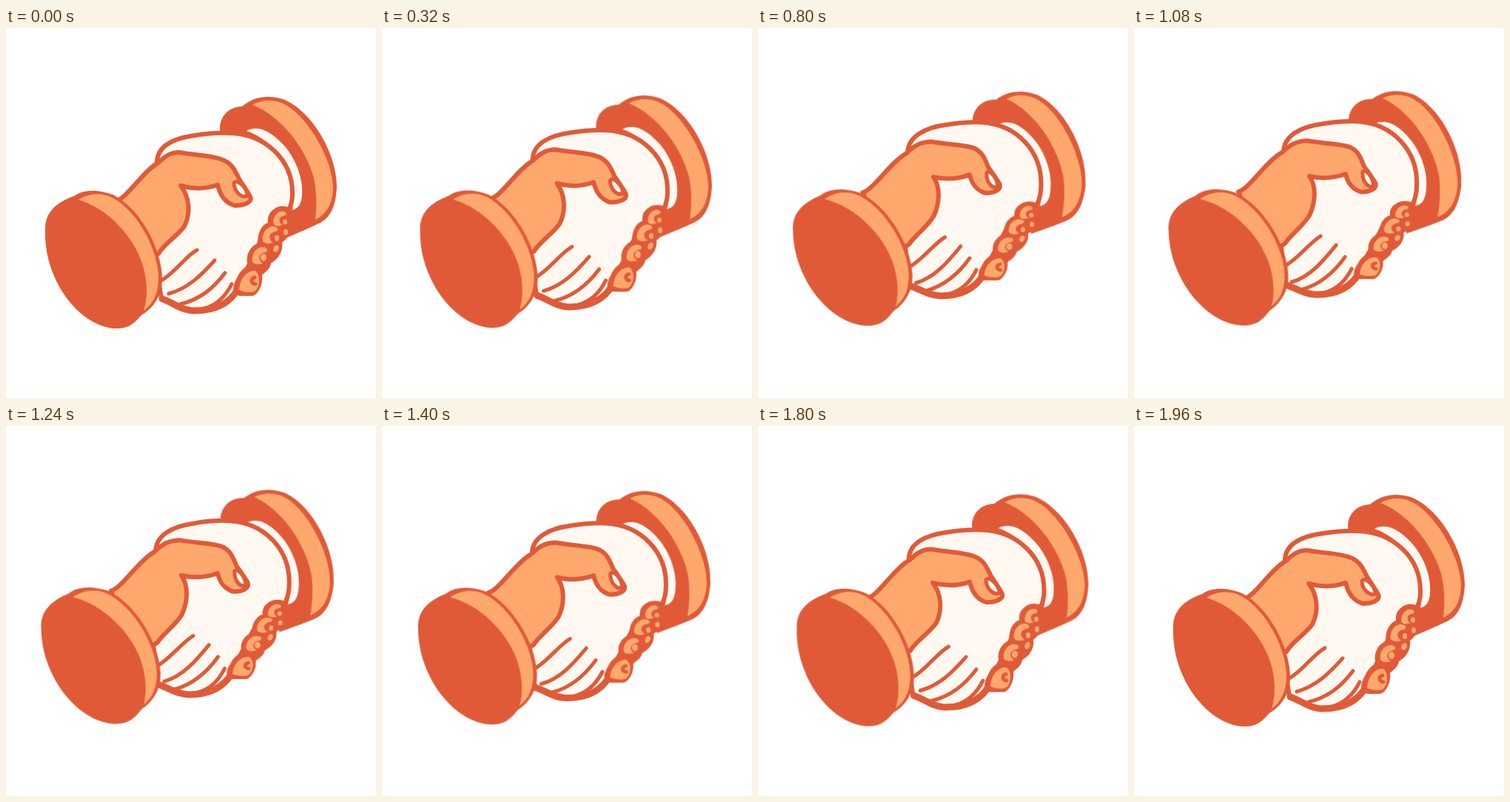
An HTML page without scripts for the animation above (2000 ms loop, 500 by 500 pixels).

```html
<!DOCTYPE html>
<html lang="en">
<head>
<meta charset="utf-8">
<title>Handshake</title>
<style>
  :root { --red: #e15a38; --orange: #fea86e; --cream: #fff9f2; }
  html, body { margin: 0; width: 100%; height: 100%; overflow: hidden; background: #fff; }
  svg { display: block; width: 100vw; height: 100vh; }

  .red { fill: var(--red); }
  .orange { fill: var(--orange); }
  .cream { fill: var(--cream); }
  .line { fill: none; }
  .ink { stroke: var(--red); stroke-width: 6; stroke-linecap: round; stroke-linejoin: round; }
  .thin { stroke-width: 5; }
  .thick { stroke-width: 9; }

  /* every part swings between the low and the high pose */
  .swing { animation: 1s cubic-bezier(.37, 0, .63, 1) infinite alternate; }
  #leftCuff { transform-origin: 80px 380px; animation-name: leftCuff; }
  #rightCuff { transform-origin: 466px 144px; animation-name: rightCuff; }
  #hand { animation-name: hand; }
  #base { animation-name: base; }
  #slits { animation-name: slits; }
  #arm { animation-name: arm; }
  #nail { animation-name: nail; }
  #knuckles { animation-name: knuckles; }

  @keyframes leftCuff { to { transform: rotate(-3.4deg); } }
  @keyframes rightCuff { to { transform: rotate(4deg); } }
  @keyframes knuckles { to { transform: matrix(1, 0, -.02, .87, -3, 24.2); } }
  @keyframes hand { to { d: path("M202 168C202 146 224 133 256 129C276 126 288 125 302 126C350 129 384 166 382 213C382 222 380 230 377 237L335 270L304 328C297 347 283 360 246 360C230 356 216 350 205 347L198 288Z"); } }
  @keyframes base { to { d: path("M206 347C222 353 230 359 246 360C276 360 294 348 304 331"); } }
  @keyframes slits { to { d: path("M252 281C238 289 221 312 204 321M273 293C256 314 238 336 213 343M285 309C270 330 252 346 227 353M294 325C286 340 276 352 258 357"); } }
  @keyframes arm { to { d: path("M141 221C157 216 177 181 200 168C212 156 220 153 234 152C256 156 276 156 290 160C304 165 307 178 311 187C317 195 322 202 326 209C329 218 316 222 306 221C295 217 289 210 286 197C272 202 254 204 237 200C247 214 245 236 237 253C227 269 212 279 204 291L176 308Z"); } }
  @keyframes nail { to { d: path("M309 194C315 189 325 206 323 214C316 216 308 207 309 194Z"); } }
</style>
</head>
<body>
<svg viewBox="0 0 500 500">
  <defs>
    <path id="knuckle" class="orange" d="M8 -10C-1 -14 -12 -4 -10 9C-7 13 -1 13 4 11C-4 5 -1 -3 8 -4C11 -6 11 -8 8 -10Z"/>
  </defs>

  <g id="rightCuff" class="swing">
    <path class="red" d="M290 143C286 127 295 107 319 106C332 95 350 89 374 96C414 112 447 170 447 214C446 241 438 256 425 263C411 270 394 277 378 284L340 200Z"/>
    <path class="orange" d="M333 104C348 95 366 97 378 104C410 122 442 180 442 216C441 240 432 252 418 259C420 240 420 222 416 203C406 165 374 120 333 104Z"/>
    <path class="cream" d="M325 139C333 134 344 135 353 140C382 156 403 194 400 227C399 238 395 244 387 246C392 218 384 194 371 175C359 158 345 146 325 139Z"/>
  </g>

  <path id="hand" class="cream ink swing" d="M204 182C204 160 226 149 256 145C276 142 288 141 302 142C350 143 388 178 387 225C387 233 385 240 382 246L345 285L314 350C306 370 290 382 252 382C234 378 222 372 210 366L200 300Z"/>
  <path id="base" class="line ink thick swing" d="M211 366C228 372 236 381 252 382C284 383 304 370 313 353"/>
  <path id="slits" class="line ink thin swing" d="M258 300C243 308 228 331 210 341M282 314C264 334 246 352 220 359M296 331C280 352 262 367 236 373M305 346C297 362 286 374 268 379"/>

  <path id="arm" class="orange ink swing" d="M148 234C164 230 184 194 206 182C214 174 222 168 234 168C256 172 276 172 290 177C306 182 310 194 315 204C320 212 326 220 330 228C334 236 320 240 309 240C297 236 290 228 286 212C272 217 254 218 236 213C248 228 250 250 241 268C231 282 214 291 206 305L180 320Z"/>
  <path id="nail" class="cream ink thin swing" d="M308 209C314 203 327 219 326 227C319 230 308 222 308 209Z"/>

  <g id="knuckles" class="swing">
    <path class="red" d="M362 245C368 239 380 240 385 244C384 254 385 260 385 268C384 278 379 286 373 290C375 302 367 313 358 318C357 326 350 330 346 334C348 346 340 362 332 362L316 362C304 360 306 348 312 338C316 328 322 324 327 321C323 310 328 296 340 291C340 278 344 267 354 263C353 254 357 248 362 245Z"/>
    <path class="orange" d="M315 354C316 338 326 327 337 328C344 334 344 349 336 356C328 358 322 357 315 354Z"/>
    <path class="line ink thin" d="M336 337C330 338 331 346 337 346"/>
    <use href="#knuckle" x="343" y="307"/>
    <use href="#knuckle" x="357" y="279"/>
    <use href="#knuckle" transform="translate(370 257) scale(.85)"/>
    <g class="orange">
      <ellipse cx="348" cy="310" rx="4" ry="5"/>
      <ellipse cx="365" cy="298" rx="3.5" ry="5" transform="rotate(25 365 298)"/>
      <ellipse cx="366" cy="284" rx="3" ry="4"/>
      <ellipse cx="378" cy="276" rx="3" ry="4"/>
      <ellipse cx="377" cy="262" rx="3" ry="3.5"/>
    </g>
  </g>

  <g id="leftCuff" class="swing">
    <path class="red" d="M53 274C52 250 67 236 92 227C104 219 122 217 146 226C182 245 212 300 211 342C210 362 200 378 183 388C176 396 167 406 152 406C101 407 51 341 53 274Z"/>
    <path class="orange" d="M98 232C112 223 130 222 145 230C178 248 206 300 206 338C206 358 199 373 186 382C192 364 191 342 185 321C173 282 138 244 98 232Z"/>
  </g>
</svg>
</body>
</html>
```
